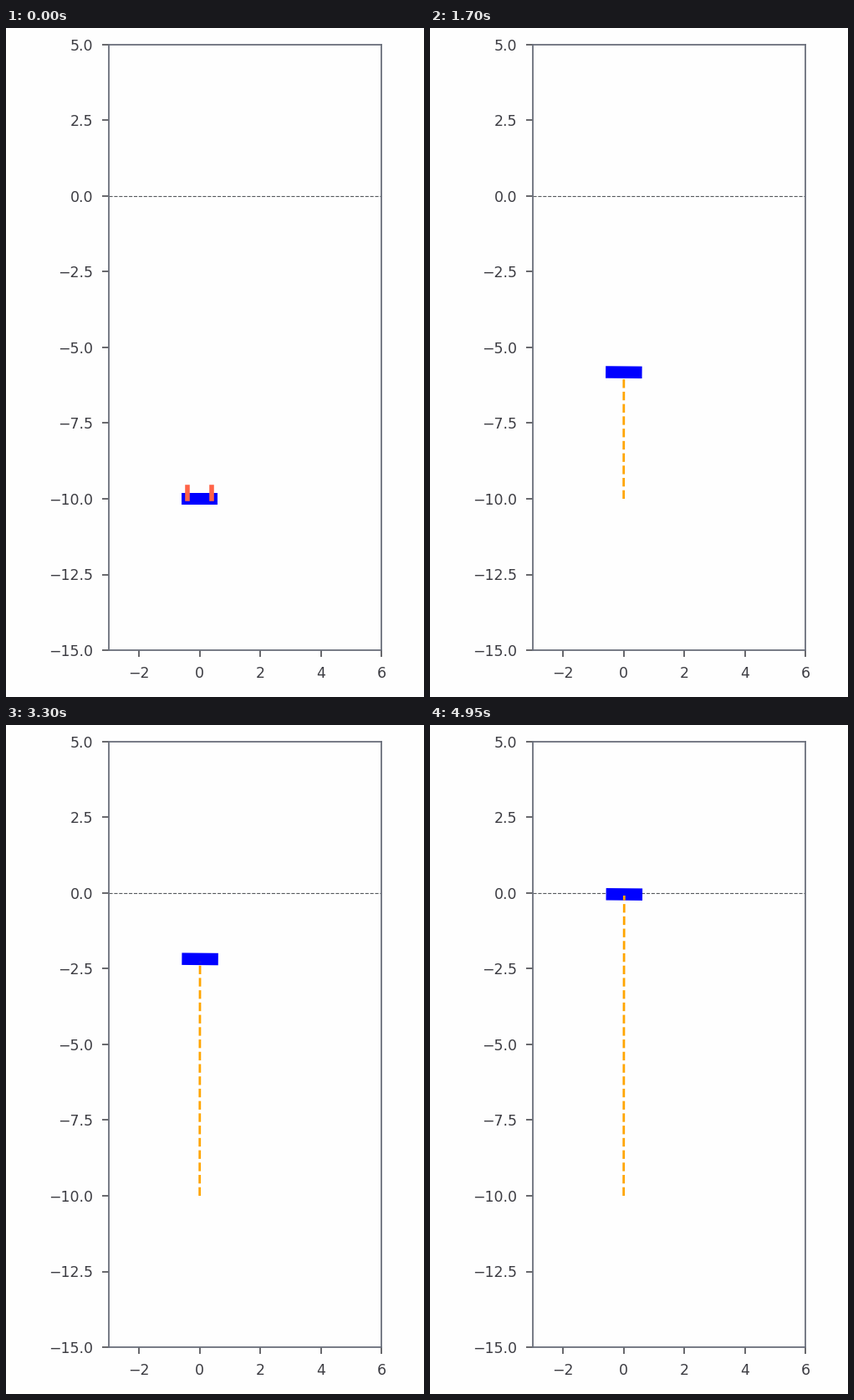
Recreate the animation shown at these times as a matplotlib script. Size 500x800 px, loop 5 s.

```python
import matplotlib.pyplot as plt
import numpy as np
from matplotlib.animation import FuncAnimation

W, H, DPI = 500, 800, 100
FRAMES, INTERVAL = 100, 50
BURN_END = 15          # last step with the thrusters on
HALF_W, HALF_H = 0.6, 0.2
MOUNT = 0.4            # thruster distance from the centre
INK, EDGE = "#3c3c42", "#6a6f7b"

plt.rcParams["font.family"] = "DejaVu Sans"

# Climb: constant push, then coasting against gravity
k = np.arange(FRAMES)
step = np.where(k <= BURN_END, 0.0055 + 0.010044 * k, 0.18994 - 0.001508 * k)
step[0] = 0
ys = -10 + np.cumsum(step)
xs = 0.0002 * np.maximum(k - 8, 0)
tilts = -0.009 * np.minimum(k / BURN_END, 1)

fig = plt.figure(figsize=(W / DPI, H / DPI), dpi=DPI, facecolor="#fefefe")
ax = fig.add_axes([123 / W, 56 / H, 326 / W, 724 / H], facecolor="#fefefe")
ax.set_xlim(-3, 6)
ax.set_ylim(-15, 5)
ax.set_xticks(range(-2, 7, 2))
ax.set_yticks(np.arange(-15, 5.1, 2.5))
ax.tick_params(length=5.5, width=1.1, pad=8, labelsize=12.5,
               color=INK, labelcolor=INK)
for spine in ax.spines.values():
    spine.set(color=EDGE, linewidth=1.3)

ax.axhline(0, color="#55595c", lw=0.8, ls="--", zorder=0.5)
body = plt.Polygon(np.zeros((4, 2)), facecolor="blue", edgecolor="none", zorder=1)
ax.add_patch(body)
trail, = ax.plot([], [], color="orange", lw=2, ls="--", zorder=2)
flames = [ax.plot([], [], color="tomato", lw=4, zorder=3)[0] for _ in range(2)]

CORNERS = np.array([(-HALF_W, -HALF_H), (HALF_W, -HALF_H),
                    (HALF_W, HALF_H), (-HALF_W, HALF_H)])


def place(points, i):
    """Turn body coordinates into stage coordinates at step i."""
    c, s = np.cos(tilts[i]), np.sin(tilts[i])
    return np.asarray(points) @ np.array([[c, s], [-s, c]]) + (xs[i], ys[i])


def thrust(i):
    if i < BURN_END:
        return 0.4
    return 0.31 if i == BURN_END else 0


def draw(i):
    body.set_xy(place(CORNERS, i))
    trail.set_data(xs[:i], ys[:i])
    length = thrust(i)
    for flame, side in zip(flames, (-MOUNT, MOUNT)):
        flame.set_visible(length > 0)
        flame.set_data(*place([(side, 0), (side, length)], i).T)
    return [body, trail, *flames]


anim = FuncAnimation(fig, draw, frames=FRAMES, interval=INTERVAL,
                     init_func=lambda: draw(0), repeat=True, repeat_delay=0)
plt.show()
```
